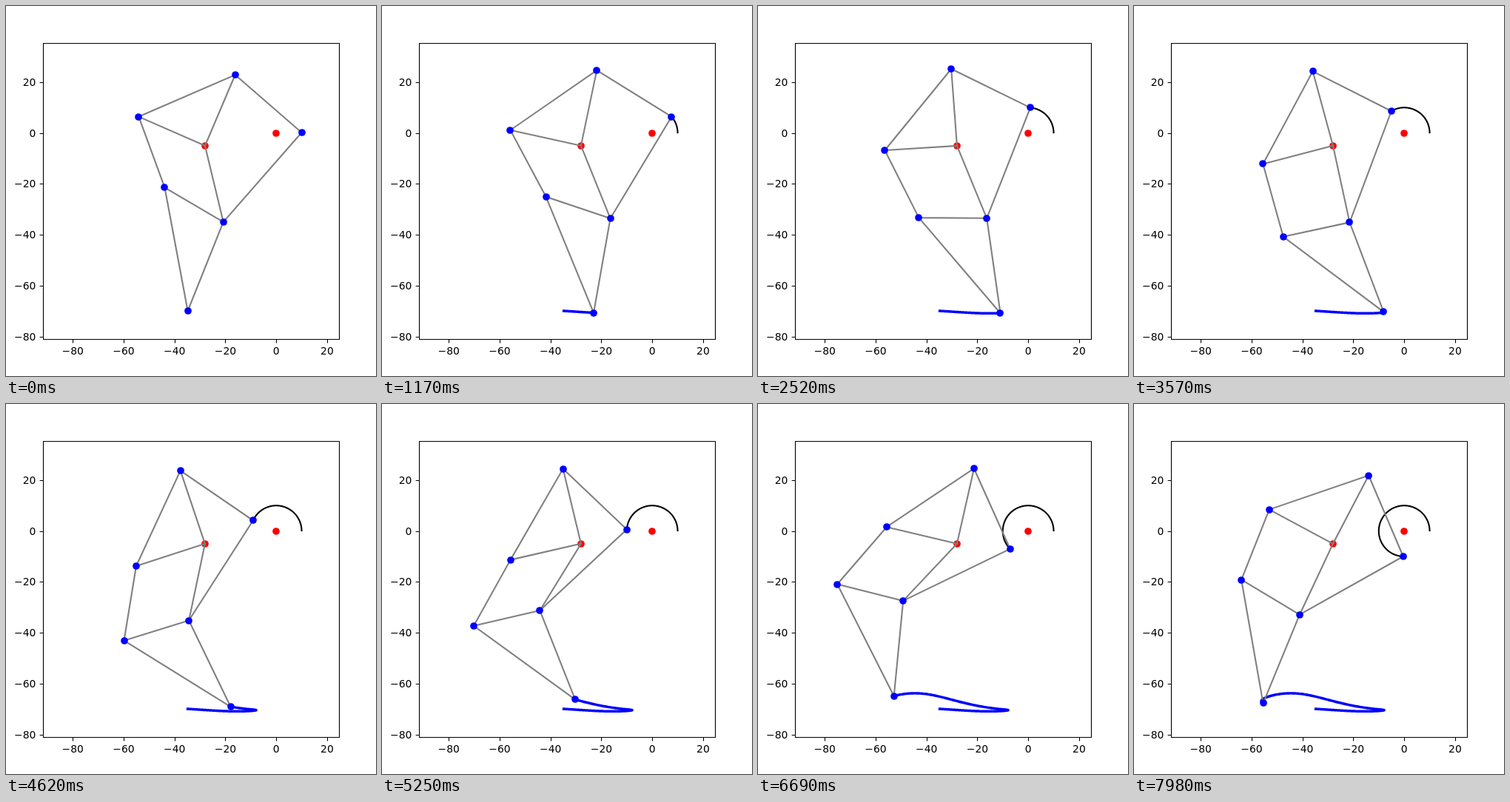
An HTML page that plays this animation: 500x500 px, repeating every 8 s.

```html
<!DOCTYPE html>
<html lang="en">
<head>
<meta charset="utf-8">
<title>Walking linkage</title>
<style>
  html, body { margin: 0; width: 100%; height: 100%; overflow: hidden; background: #fff; }
  svg { display: block; width: 500px; height: 500px; }
  text { font: 13.89px "DejaVu Sans", sans-serif; fill: #000; }
  path { fill: none; stroke-linejoin: round; stroke-linecap: square; }
  .axis { stroke: #000; stroke-width: 1.11; stroke-linecap: butt; stroke-linejoin: miter; }
  .links { stroke: #808080; stroke-width: 2.083; }
  .crank { stroke: #000; stroke-width: 2.083; }
  .foot { stroke: #00f; stroke-width: 3.472; }
</style>
</head>
<body>
<svg id="plot" viewBox="0 0 500 500"></svg>
<script>
const LOOP = 8000, STEP = 30, COUNT = 267;
const SCALE = 3.4375, ORIGIN = [365.15, 171.65];
const CENTER = [0, 0], PIVOT = [-28, -5], CRANK = 10;

const svg = document.getElementById('plot');
function add(tag, attrs, text) {
  const el = document.createElementNS('http://www.w3.org/2000/svg', tag);
  for (const key in attrs) el.setAttribute(key, attrs[key]);
  if (text) el.textContent = text;
  return svg.appendChild(el);
}

const toStage = ([x, y]) => [ORIGIN[0] + x * SCALE, ORIGIN[1] - y * SCALE];
const polyline = points =>
  'M' + points.map(p => toStage(p).map(v => v.toFixed(2)).join(' ')).join('L');

// Dots sit on whole pixels.
function placeDot(dot, point) {
  const [x, y] = toStage(point).map(Math.round);
  dot.setAttribute('cx', x);
  dot.setAttribute('cy', y);
}
const addDot = color => add('circle', { r: 4.86, fill: color });

// Joint at distances rp and rq from p and q, to the left of the way from p to q.
function joint(p, q, rp, rq) {
  const dx = q[0] - p[0], dy = q[1] - p[1], d = Math.hypot(dx, dy);
  const along = (rp * rp - rq * rq + d * d) / (2 * d);
  const off = Math.sqrt(rp * rp - along * along);
  return [p[0] + (along * dx - off * dy) / d, p[1] + (along * dy + off * dx) / d];
}

function pose(step) {
  const angle = (step + 1) * 2 * Math.PI / 359;
  const crank = [CRANK * Math.cos(angle), CRANK * Math.sin(angle)];
  const top = joint(PIVOT, crank, 30.3, 34.62);
  const knee = joint(crank, PIVOT, 46.72, 30.82);
  const back = joint(PIVOT, top, 28.43, 41.32);
  const heel = joint(knee, back, 26.7, 29.7);
  const foot = joint(knee, heel, 37.66, 49.3);
  return { crank, top, knee, back, heel, foot };
}
const poses = Array.from({ length: COUNT }, (_, i) => pose(i));

function drawAxes() {
  let ticks = '';
  for (let v = -80; v <= 20; v += 20) {
    const [x, y] = toStage([v, v]);
    const tx = Math.round(x) + 0.5, ty = Math.round(y) + 0.5;
    const label = String(v).replace('-', '\u2212');
    ticks += `M${tx} 450.5v4.9M50.5 ${ty}h-4.9`;
    add('text', { x, y: 471, 'text-anchor': 'middle' }, label);
    add('text', { x: 40.3, y: Math.round(y) + 5, 'text-anchor': 'end' }, label);
  }
  add('path', { class: 'axis', d: 'M50.5 50.5h400v400h-400z' + ticks });
}

drawAxes();
placeDot(addDot('#f00'), CENTER);
placeDot(addDot('#f00'), PIVOT);
const crankTrail = add('path', { class: 'crank' });
const footTrail = add('path', { class: 'foot' });
const links = add('path', { class: 'links' });
const dots = Object.keys(poses[0]).map(name => [name, addDot('#00f')]);

function draw(step) {
  const { crank, top, knee, back, heel, foot } = poses[step];
  const past = poses.slice(0, step + 1);
  crankTrail.setAttribute('d', step ? polyline(past.map(p => p.crank)) : '');
  footTrail.setAttribute('d', step ? polyline(past.map(p => p.foot)) : '');
  links.setAttribute('d', [
    [crank, top], [crank, knee], [PIVOT, top], [PIVOT, back], [top, back],
    [PIVOT, knee], [back, heel], [heel, knee], [heel, foot], [knee, foot]
  ].map(polyline).join(''));
  for (const [name, dot] of dots) placeDot(dot, poses[step][name]);
}

let shown = -1;
function tick() {
  const step = Math.min(COUNT - 1, Math.floor((performance.now() % LOOP) / STEP));
  if (step !== shown) draw(shown = step);
  requestAnimationFrame(tick);
}
tick();
</script>
</body>
</html>
```
